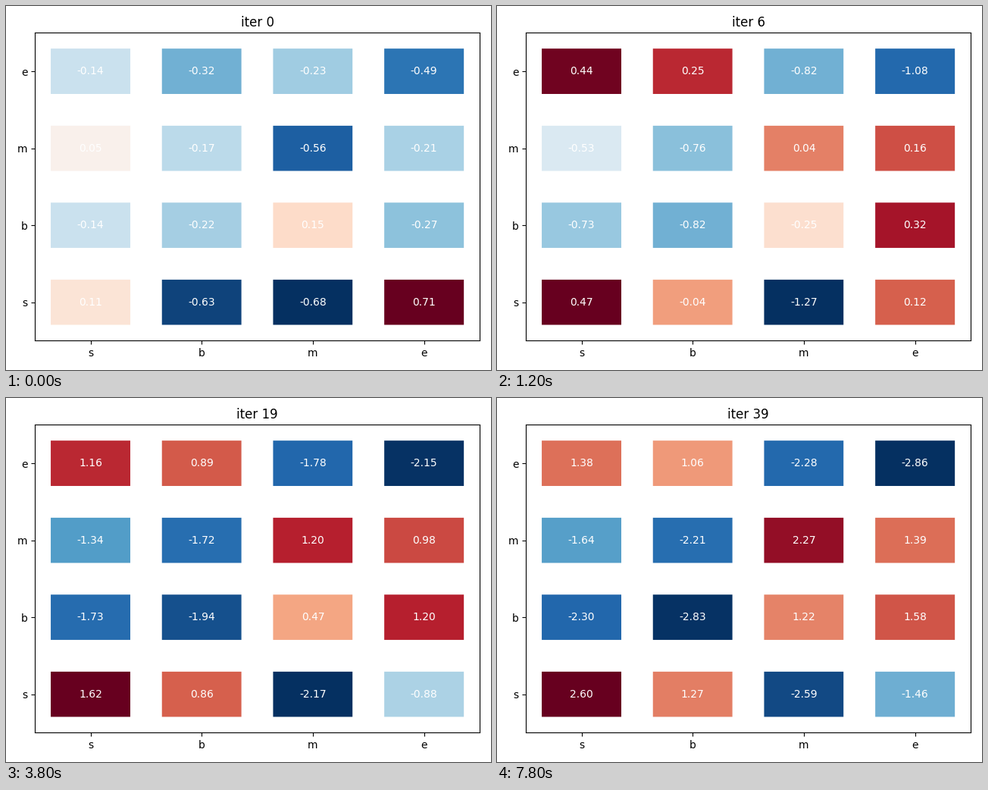
Write a matplotlib script that moves like this. It is 640 px wide and 480 px high and loops after 8 s.

```python
import numpy as np
import matplotlib.pyplot as plt
from matplotlib.animation import FuncAnimation

FRAMES, INTERVAL = 40, 200
LAST = FRAMES - 1
TAGS = "sbme"
STEP = 0.1       # change of every weight per iteration at the start
BEND = 2.5       # how sharply the steady climb levels off

# Start weights and their total change; rows and columns in the order of TAGS.
START = np.array([[0.11, -0.63, -0.68, 0.71],
                  [-0.14, -0.22, 0.15, -0.27],
                  [0.05, -0.17, -0.56, -0.21],
                  [-0.14, -0.32, -0.23, -0.49]])
CHANGE = np.array([[2.50, 1.90, -1.91, -2.17],
                   [-2.16, -2.61, 1.125, 1.85],
                   [-1.69, -2.04, 2.83, 1.61],
                   [1.52, 1.38, -2.05, -2.37]])

# Depth of the early dip of the weights that learn late.
DIP = np.zeros((4, 4))
for pair, depth in (("bm", 1.2), ("ss", 0.3), ("me", 0.27)):
    DIP[TAGS.index(pair[0]), TAGS.index(pair[1])] = depth


def weights_at(i):
    """Constant steps that level off at the total change, minus the dip."""
    ratio = STEP * LAST / np.abs(CHANGE)
    slowdown = 1 + (ratio ** BEND - 1) * (i / LAST) ** BEND
    travel = np.sign(CHANGE) * STEP * i / slowdown ** (1 / BEND)
    bump = (i / 10 * np.exp(1 - i / 10)) ** 2
    return START + travel - DIP * bump


fig, ax = plt.subplots(figsize=(6.4, 4.8), dpi=100)
mesh = ax.pcolor(START, cmap="RdBu_r", edgecolors="white", linewidths=30)
labels = [ax.text(x + 0.5, y + 0.5, "", color="white", ha="center", va="center")
          for y in range(4) for x in range(4)]
ticks = np.arange(4) + 0.5
ax.set_xticks(ticks, list(TAGS))
ax.set_yticks(ticks, list(TAGS))
title = ax.set_title("iter 0")
fig.tight_layout()
fig.subplots_adjust(top=1 - 35.33 / 480)


def update(i):
    w = weights_at(i)
    mesh.set_array(w)
    mesh.set_clim(w.min(), w.max())
    for label, value in zip(labels, w.flat):
        label.set_text(f"{value:.2f}")
    title.set_text(f"iter {i}")
    return [mesh, title, *labels]


anim = FuncAnimation(fig, update, frames=FRAMES, interval=INTERVAL, repeat=True)
plt.show()
```
